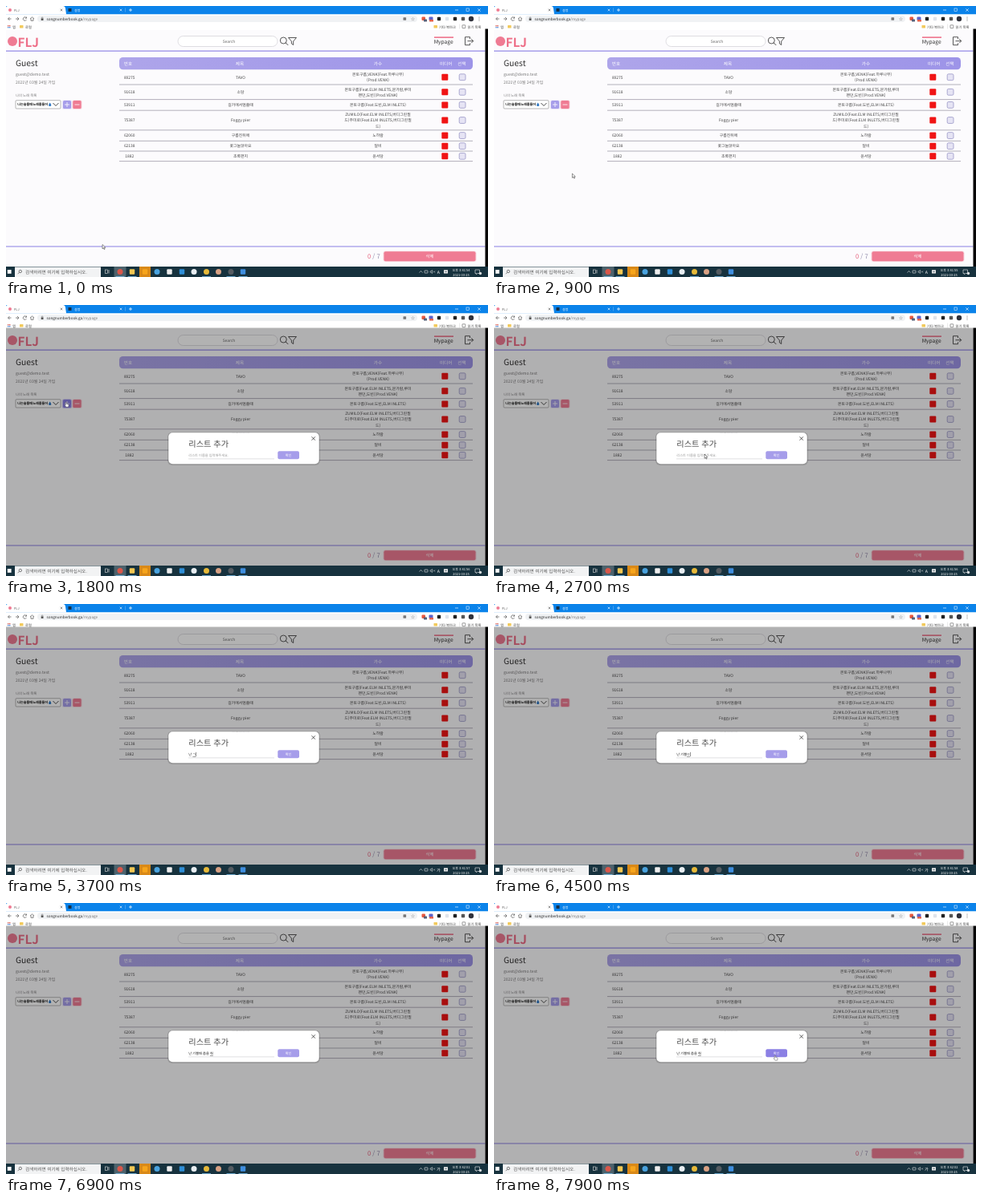
An HTML page for the animation above (8000 ms loop, 600 by 338 pixels).

```html
<!DOCTYPE html>
<html lang="ko">
<head>
<meta charset="utf-8">
<style>
html, body { margin: 0; width: 100%; height: 100%; overflow: hidden; background: #fff; }
svg { display: block; width: 600px; height: 338px; }
text { font-family: "Noto Sans CJK KR", "Noto Sans CJK", "Noto Sans", sans-serif; text-rendering: geometricPrecision; white-space: pre; }
</style>
</head>
<body>
<svg id="stage" viewBox="0 0 600 338"></svg>
<script>
const INK = '#444', PINK = '#ef7b93', VIOLET = '#a69dea', DEEP = '#8b80e4';

const text = (x, y, size, str, fill = INK, anchor = 'start', more = '') =>
  `<text x="${x}" y="${y}" font-size="${size}" fill="${fill}" text-anchor="${anchor}" ${more}>${str}</text>`;
const mid = (x, y, size, str, fill, more) => text(x, y, size, str, fill, 'middle', more);
const rect = (x, y, w, h, fill, r = 0, more = '') =>
  `<rect x="${x}" y="${y}" width="${w}" height="${h}" rx="${r}" fill="${fill}" ${more}/>`;
const dot = (x, y, r, fill, more = '') => `<circle cx="${x}" cy="${y}" r="${r}" fill="${fill}" ${more}/>`;
const line = (d, stroke = INK, w = 0.8, fill = 'none') =>
  `<path d="${d}" stroke="${stroke}" stroke-width="${w}" fill="${fill}" stroke-linejoin="round"/>`;
const cross = (x, y, r, c, w = 0.6) => line(`M${x - r} ${y - r}l${2 * r} ${2 * r}m0 ${-2 * r}l${-2 * r} ${2 * r}`, c, w);
const plus = (x, y, r, c, w = 0.8) => line(`M${x - r} ${y}h${2 * r}M${x} ${y - r}v${2 * r}`, c, w);

function browser() {
  const extras = [[539, '#222'], [549, '#dfe3ea'], [559, '#222'], [569, '#555']];
  return rect(0, 0, 600, 10.5, '#0b83ea') +
    line('M0 10.5V2Q0 0 2 0H71Q73.500 0 74 3L75 10.5Z', 'none', 0, '#fff') +
    dot(5, 5, 2, PINK) + text(10, 6.6, 4, 'FLJ', '#555') + cross(69, 5, 1.3, '#555') +
    rect(77.5, 3, 4, 4, '#16314b') + text(85, 6.6, 4, '설정', '#fff') + cross(143, 5, 1.3, '#fff') +
    line('M148.500 2.500v5', '#7cb8f0', 0.5) + plus(155, 5, 2, '#fff', 0.7) +
    line('M559 5h4', '#fff', 0.6) + rect(573, 3, 3.5, 3.5, 'none', 0, 'stroke="#fff" stroke-width=".5"') +
    cross(589, 5, 1.7, '#fff') +
    rect(0, 10.5, 600, 19.5, '#fff') +
    line('M6.500 16H2.500m2-2l-2 2l2 2M12 16h4m-2-2l2 2l-2 2', '#555', 0.7) +
    line('M25.300 14.800A2.200 2.200 0 1 0 25.500 17M25.500 13.500v1.700h-1.700', '#555', 0.7) +
    line('M30 16l2.500-2.200l2.500 2.200M31 15.500v2.800h3v-2.800', '#555', 0.7) +
    rect(39, 12, 473, 8, '#f0f2f4', 4) +
    rect(43.7, 15.4, 2.8, 2.6, '#555') + line('M44.300 15.400v-.800a.800.800 0 0 1 1.600 0v.800', '#555', 0.5) +
    text(50.500, 17.8, 4.6, 'songnumberbook.ga<tspan fill="#777">/mypage</tspan>', '#222') +
    rect(494.500, 14.200, 3.6, 3.6, '#777', 0.6) +
    mid(506.500, 18, 5, '☆', '#666') +
    rect(517.500, 13.500, 4.500, 4.500, '#e5573f', 1) + rect(520, 16.500, 4, 3, '#57627a', 0.5) +
    rect(526.500, 13.500, 5, 4.500, '#5c62c8', 1) + rect(527, 17, 5, 2.500, '#e4604c', 0.5) +
    extras.map(([x, c]) => rect(x - 2.200, 13.800, 4.400, 4.400, c, 1)).join('') +
    dot(579, 16, 3.200, '#30313a') + [14, 16, 18].map(y => dot(589, y, 0.500, '#555')).join('') +
    [2, 4].map(x => rect(x, 24, 1.4, 1.4, '#d65b52') + rect(x, 26, 1.4, 1.4, '#4b88d8')).join('') +
    text(8, 27.6, 4.3, '앱', '#444') +
    rect(17, 24, 4.500, 3.500, '#f2ca5c', 0.500) + text(24, 27.6, 4.3, '로컬', '#444') +
    rect(532.500, 24, 4.500, 3.500, '#f2ca5c', 0.500) + text(539, 27.6, 4.3, '기타 북마크', '#444') +
    line('M564.500 22.500v6', '#ccc', 0.4) + rect(568, 23.8, 3.8, 3.8, 'none', 0.4, 'stroke="#555" stroke-width=".6"') +
    text(574.500, 27.6, 4.3, '읽기 목록', '#444');
}

function header() {
  return dot(8, 44, 6, PINK) +
    text(14.500, 50.8, 15.3, 'FLJ', '#ee7089', 'start', 'font-weight="700"') +
    rect(214, 37.500, 124, 13, '#fff', 6.500, 'stroke="#d2d0d6" stroke-width=".7"') +
    mid(277.500, 46, 4.9, 'Search', '#666') +
    dot(345.3, 43, 4, 'none', 'stroke="#444" stroke-width=".9"') + line('M348.200 45.900l3 3', INK, 1) +
    line('M351.500 39.500h10l-3.800 4.500v4.500l-2.300-1.500v-3z', INK, 0.9) +
    rect(533, 38.3, 24, 1.7, PINK) + mid(544.700, 47.3, 6.7, 'Mypage', '#333', 'font-weight="500"') +
    line('M577.500 41v-2.300h-6v10h6v-2.300M574.500 43.700h7m-2.300-2.500l2.500 2.500l-2.500 2.500', INK, 0.9) +
    rect(0, 55.4, 596.500, 1.5, VIOLET);
}

function sidebar() {
  return text(12, 75, 10.3, 'Guest', '#333', 'start', 'font-weight="500"') +
    text(12, 86.600, 5.1, 'guest@demo.test', '#777') +
    text(12, 97, 5, '2021년 03월 24일 가입', '#777') +
    text(12, 112.800, 4.3, '나의 노래 목록', '#777') +
    rect(12, 117.700, 56, 10.300, '#fff', 1, 'stroke="#888" stroke-width=".6"') +
    text(14.300, 124.300, 4.1, '나는슬플때노래를들어', '#111', 'start', 'font-weight="700"') +
    line('M54.700 120.500q3.300 4.500 0 4.500t0-4.500', 'none', 0, '#2f78c4') +
    line('M58.500 121l3.500 3.500l3.500-3.500', '#333', 0.9) +
    rect(70, 117.200, 12, 11.800, VIOLET, 2.500, 'id="glow" opacity=".25"') +
    rect(71, 118, 10, 10, VIOLET, 1.500, 'id="add"') + plus(76, 123, 3, '#fff') +
    rect(82.300, 117.200, 12.300, 11.800, PINK, 2.500, 'opacity=".25"') +
    rect(83.300, 118, 10.300, 10, PINK, 1.500) + line('M85.500 123h6', '#fff');
}

const songs = [
  // separator y, number, title, artist lines
  [98, '89275', 'TAVO', '몬토구름,VENK(Feat.하루나무)|(Prod.VENK)'],
  [116.600, '91618', '소담', '몬토구름(Feat.ELM INLETS,문가람,루미|펜던,도빈)(Prod.VENK)'],
  [130.200, '53911', '길가에서멈출때', '몬토구름(Feat.도빈,ELM INLETS)'],
  [154.800, '75387', 'Foggy pier', 'ZUMILO(Feat.ELM INLETS,버디그린필|드)주미로(Feat.ELM INLETS,버디그린필|드)'],
  [168.300, '62060', '구름진뒤에', '노하람'],
  [181, '62138', '꽃그늘앉아요', '달비'],
  [193.600, '1882', '초록편지', '윤서담'],
];

function table() {
  const heads = [[152, '번호'], [291, '제목'], [463, '가수'], [547.700, '미디어'], [567.500, '선택']];
  let top = 79.500;
  return rect(141, 64, 440, 15.300, 'url(#bar)', 4.500) +
    heads.map(([x, s]) => mid(x, 73.700, 5.600, s, '#fff')).join('') +
    songs.map(([bottom, num, title, artist]) => {
      const y = (top + bottom) / 2, lines = artist.split('|');
      top = bottom;
      return line(`M141 ${bottom}H581`, '#94909f', 0.7) +
        mid(153.700, y + 1.800, 4.9, num) + mid(292, y + 1.800, 4.9, title) +
        lines.map((s, i) => mid(463, y + 1.800 + (i - (lines.length - 1) / 2) * 7.200, 4.9, s)).join('') +
        rect(542.300, y - 4, 8, 8, '#f01414', 1) +
        rect(564.200, y - 3.900, 7.800, 7.800, '#e6e4f4', 1.500, 'stroke="#8f8cc0" stroke-width=".7"');
    }).join('');
}

function footer() {
  return rect(0, 299.300, 596.500, 1.300, VIOLET) +
    text(450, 315, 7.600, '<tspan fill="#e5637e">0</tspan> / 7', '#8d88a8') +
    rect(469.500, 305.600, 116, 13.400, PINK, 3, 'opacity=".3"') +
    rect(470.500, 306.300, 114, 12, PINK, 2) + mid(527.500, 314.300, 5.400, '삭제', '#fff');
}

function taskbar() {
  const apps = [[142, '#d9574a'], [157, '#f3c752'], [173, '#f7a51c'], [188, '#4aa3df'], [203.500, '#eee'], [219, '#2f8fd8'],
    [234, '#e8eef2'], [249.500, '#e6b93a'], [264.500, '#d8a184'], [280, '#555c62'], [295, '#3f8fe0']];
  const square = [157, 173, 203.500, 219, 295];
  return rect(0, 325, 600, 13, '#17323e') + rect(1.800, 329, 4.800, 4.800, '#fff') +
    rect(11, 325.500, 107, 12.500, '#f2f3f4') +
    dot(17.800, 331, 1.700, 'none', 'stroke="#333" stroke-width=".6"') + line('M16.600 332.200l-2 2', '#333', 0.6) +
    text(24, 333.700, 5.600, '검색하려면 여기에 입력하십시오.', '#555') +
    rect(123.500, 329, 3, 4.500, 'none', 0, 'stroke="#ddd" stroke-width=".6"') + line('M128 329v4.500', '#ddd', 0.7) +
    rect(134.500, 325, 15, 13, '#4d626c') + rect(166, 325, 14, 13, '#d98918') +
    apps.map(([x, c]) => square.includes(x) ? rect(x - 3.200, 328.300, 6.400, 6.400, c, 1) : dot(x, 331.500, 3.500, c)).join('') +
    [142, 157, 249.500, 280, 295].map(x => rect(x - 5.500, 337.200, 11, 0.800, '#7cc0ec')).join('') +
    line('M514.500 332.500l2-2l2 2', '#eee', 0.6) +
    rect(521, 330, 4, 3, 'none', 0.300, 'stroke="#eee" stroke-width=".6"') +
    line('M528 330.800h1l1.500-1.300v4l-1.500-1.300h-1z', '#eee', 0.5) + cross(533, 331.500, 0.900, '#eee', 0.5) +
    mid(538.300, 333.700, 5.200, '', '#fff', 'id="ime"') +
    rect(545, 329.300, 5, 4.200, '#eee', 0.300) + line('M546 331.400h3', '#17323e', 0.6) +
    mid(566.500, 330.500, 4, '', '#fff', 'id="clock"') + mid(566.500, 336.600, 4, '2021-03-25', '#fff') +
    line('M584 329h5.500v4.500h-2.700l-1.300 1.300v-1.300h-1.500z', '#eee', 0.6) + dot(590.500, 333.500, 1.700, '#d8dde0');
}

function modal() {
  return `<g id="modal">${rect(0, 28.500, 596.500, 296.500, '#000', 0, 'opacity=".3"')}
    ${rect(201, 158.500, 190, 41.500, '#000', 6, 'opacity=".15"')}
    ${rect(202.300, 159.300, 187.400, 39, '#fff', 5)}
    ${cross(382.700, 166.500, 2.200, '#333', 0.8)}
    ${text(227.300, 177.200, 10.200, '리스트 추가', '#444')}
    ${line('M227 191.900H334', '#c9c9cf', 0.6)}
    ${text(227.300, 189, 4.200, '', '#999', 'start', 'id="field"')}
    ${rect(235, 184.800, 0.500, 5.300, '#222', 0, 'id="caret"')}
    ${rect(338.300, 182.300, 26.700, 9.900, VIOLET, 2, 'id="ok"')}
    ${mid(351.600, 188.900, 4.200, '확인', '#fff')}</g>`;
}

const $ = id => document.getElementById(id);
$('stage').innerHTML =
  `<defs><linearGradient id="bar"><stop stop-color="#aea5ea"/><stop offset="1" stop-color="#9d94e8"/></linearGradient></defs>` +
  rect(0, 30, 600, 295, '#fcfbfd') + browser() + header() + sidebar() + table() + footer() +
  rect(596.500, 28.500, 3.500, 296.500, '#050505') + modal() + taskbar() +
  `<g id="pointer"><g id="arrow">${line('M0 0v5.300l1.300-1.200l.9 2l.9-.4l-.9-1.900h1.700z', '#222', 0.5, '#fff')}</g>
   <g id="hand">${line('M-.700 3.500V.400q.700-.900 1.300 0v2l2 .600q.700.300.500 1.200l-.500 2h-2.800l-1.700-2.400q.500-.900 1.200-.300z', '#222', 0.4, '#fff')}</g></g>`;

// Every state of the input while syllables are being composed.
const typed = ('ㄴ,나,난,난 ,난 ㄱ,난 기,난 기ㅃ,난 기쁘,난 기쁠,난 기쁠ㄸ,난 기쁠때,난 기쁠때 ,난 기쁠때 ㅊ,난 기쁠때 추,' +
  '난 기쁠때 춤,난 기쁠때 춤ㅇ,난 기쁠때 춤으,난 기쁠때 춤을,난 기쁠때 춤을 ,난 기쁠때 춤을 ㅊ,난 기쁠때 춤을 추,난 기쁠때 춤을 춰').split(',');

const path = [[0, 120, 297.500], [400, 120, 297.500], [1400, 75, 121], [2000, 75, 121], [2700, 262, 186],
  [7100, 262, 186], [7750, 350, 190], [8000, 350, 190]];

function pointerAt(t) {
  const i = path.findIndex(p => p[0] > t), [t0, x0, y0] = path[i - 1], [t1, x1, y1] = path[i];
  const k = (t - t0) / (t1 - t0), e = k * k * (3 - 2 * k);
  return [x0 + (x1 - x0) * e, y0 + (y1 - y0) * e];
}

const show = (id, on) => $(id).style.display = on ? '' : 'none';
const over = (x, y, l, t, r, b) => x > l && x < r && y > t && y < b;

function drawField(t) {
  const key = Math.min(Math.floor((t - 3110) / 145), typed.length - 1), field = $('field');
  if (key < 0) {
    field.textContent = '리스트 이름을 입력해주세요.';
    field.setAttribute('fill', '#999');
    $('caret').setAttribute('x', 227);
  } else {
    const value = typed[key].replace(/ /g, '\u00a0'), last = value.slice(-1);
    field.innerHTML = value.slice(0, -1) + `<tspan text-decoration="${last === '\u00a0' ? 'none' : 'underline'}">${last}</tspan>`;
    field.setAttribute('fill', '#222');
    $('caret').setAttribute('x', 227.500 + field.getComputedTextLength());
  }
  show('caret', t > 2750 && t < 7700 && (key >= 0 && key < typed.length - 1 || t % 1000 < 500));
}

function frame(now) {
  const t = now % 8000, open = t >= 1800, [x, y] = pointerAt(t);
  const onAdd = over(x, y, 71, 118, 81, 128), onOk = open && over(x, y, 338, 182, 365, 192);
  show('modal', open);
  if (open) drawField(t);
  $('add').setAttribute('fill', onAdd ? DEEP : VIOLET);
  $('glow').setAttribute('opacity', onAdd ? 0.6 : 0.25);
  $('ok').setAttribute('fill', onOk ? DEEP : VIOLET);

  const hand = onAdd || onOk;
  show('pointer', t < 3110 || t > 7100);
  show('hand', hand);
  show('arrow', !hand);
  $('pointer').setAttribute('transform', `translate(${x} ${y})`);

  const sec = 54 + Math.floor((t + 200) / 1000);
  $('clock').textContent = `오후 3:${41 + Math.floor(sec / 60)}:${String(sec % 60).padStart(2, '0')}`;
  $('ime').textContent = t < 3000 ? 'A' : '가';
  requestAnimationFrame(frame);
}
requestAnimationFrame(frame);
</script>
</body>
</html>
```
